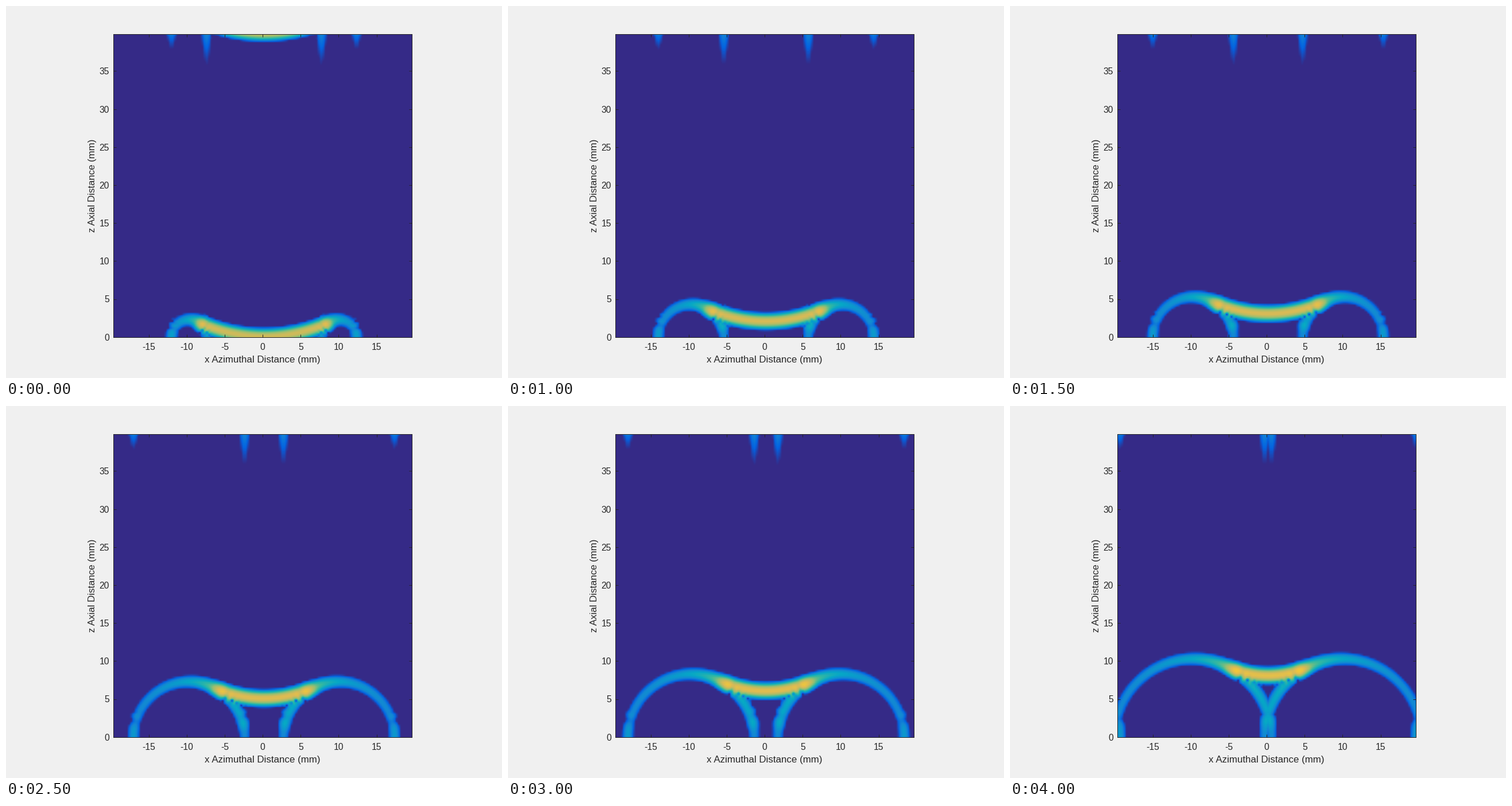
A matplotlib script that plays this animation: 864x648 px, repeating every 4500 ms.

```python
import numpy as np
import matplotlib.pyplot as plt
from matplotlib.animation import FuncAnimation
from matplotlib.colors import LinearSegmentedColormap

W, H, DPI = 864, 648, 100
FRAMES, INTERVAL = 9, 500
INK = (0.15, 0.15, 0.15)

# Grid (mm); the field is periodic in both directions
STEP = 0.3
X_MAX, Z_MAX = 19.65, 39.9
PERIOD_X, PERIOD_Z = 39.6, 39.9
xs = -X_MAX + STEP * np.arange(132)
zs = STEP * np.arange(134)
zs = np.where(zs > 30, zs - PERIOD_Z, zs)
X, Z = np.meshgrid(xs, zs)

# Focused aperture
MID, HALF, FOCUS = 0.15, 9.85, 20.95
SLANT = np.hypot(HALF, FOCUS)
SIN0 = HALF / SLANT
WAVE_K = 2 * np.pi / 0.5
PULSE = 2.2

cmap = LinearSegmentedColormap.from_list(
    "field", "#352a87 #0363e1 #1485d4 #06a7c6 #38b99e "
             "#92bf73 #d9ba56 #fcce2e #f9fb0e".split())


def amp(level):
    """Amplitude for a level on the 40 dB display scale."""
    return 10 ** (2 * (level - 1))


def pulse(d):
    return np.exp(-PULSE * d ** 2 + 1j * WAVE_K * d)


def stronger(a, b):
    return np.where(np.abs(a) > np.abs(b), a, b)


def edge_wave(dx, r, gain, inside):
    """Circular wave from one end of the aperture; dx points outwards."""
    dist = np.hypot(dx, Z) + 1e-9
    u = np.abs(dx / dist + SIN0) / (0.072 * np.sqrt(4.3 / r))
    lag = np.exp(0.25j * np.pi * u / (1 + u))
    size = 0.5 * gain / np.sqrt(1 + u)
    return np.where(Z >= 0, np.where(inside, -lag, 1) * size * pulse(dist - r), 0)


def spike(dx, level, down, up):
    """Narrow wedge around z = 0, fading over its length."""
    dx = (dx + PERIOD_X / 2) % PERIOD_X - PERIOD_X / 2
    fade = np.clip(1 - np.abs(Z) / np.where(Z < 0, down, up), 0, 1) ** 1.1
    weight = np.where(Z < 0, 1, 0.55) * (fade > 0)
    return weight * amp(level * fade) * pulse(dx) * np.exp(0.25j * np.pi)


def side_field(side, r, gain, inside):
    dx = side * (X - MID) - HALF
    return (edge_wave(dx, r, gain, inside)
            + edge_wave(dx + PERIOD_X, r, gain, False)
            + spike(-dx - r, 0.26, 4.3, 4.3)
            + spike(dx - r, 0.22, 2.2, 3.5))


def field(i):
    r = 2.3 + i
    radius = SLANT - r
    gain = amp(0.74 + 0.25 * np.log10(20.85 / radius))
    inside = np.abs(X - MID) < (FOCUS - Z) * HALF / FOCUS
    main = gain * inside * pulse(radius - np.hypot(X - MID, Z - FOCUS))
    ends = stronger(*(side_field(s, r, gain, inside) for s in (-1, 1)))
    return np.clip(1 + 0.5 * np.log10(np.abs(main + ends) + 1e-9), 0, 1)


fig = plt.figure(figsize=(W / DPI, H / DPI), dpi=DPI, facecolor="#f0f0f0")
LEFT, RIGHT, TOP, BOTTOM = 187, 707.2, 48.6, 576.7
CENTER = (LEFT + RIGHT) / 2
SCALE = (RIGHT - LEFT) / (2 * X_MAX)
ax = fig.add_axes([LEFT / W, 1 - BOTTOM / H, (RIGHT - LEFT) / W, (BOTTOM - TOP) / H])
h = STEP / 2
img = ax.imshow(field(0), cmap=cmap, vmin=0, vmax=1, origin="lower", aspect="auto",
                extent=(-X_MAX - h, X_MAX + h, -h, Z_MAX + h),
                interpolation="bilinear", interpolation_stage="data")
ax.set_xlim(-X_MAX, X_MAX)
ax.set_ylim(0, Z_MAX)
ax.set_xticks(range(-15, 16, 5))
ax.set_yticks(range(0, 36, 5))
ax.tick_params(direction="in", length=5 * 0.72, width=0.72, color=INK,
               top=True, right=True, labelbottom=False, labelleft=False)
for spine in ax.spines.values():
    spine.set(color=INK, linewidth=0.72)


def label(x, y, s, px, ha="center", **kw):
    fig.text(x / W, 1 - y / H, s, fontsize=px * 72 / DPI, color=INK,
             family="Liberation Sans", ha=ha, va="baseline", **kw)


for v in ax.get_xticks():
    label(CENTER + v * SCALE, 599, f"{v:.0f}", 15.6)
for v in ax.get_yticks():
    label(180, BOTTOM - v * SCALE + 5.9, f"{v:.0f}", 15.6, ha="right")
label(CENTER, 620.5, "x Azimuthal Distance (mm)", 16.9)
label(155, 313, "z Axial Distance (mm)", 16.8, rotation=90, rotation_mode="anchor")


def draw(i):
    img.set_data(field(i))
    return [img]


anim = FuncAnimation(fig, draw, frames=FRAMES, interval=INTERVAL,
                     repeat=True, repeat_delay=0, blit=False)
plt.show()
```
